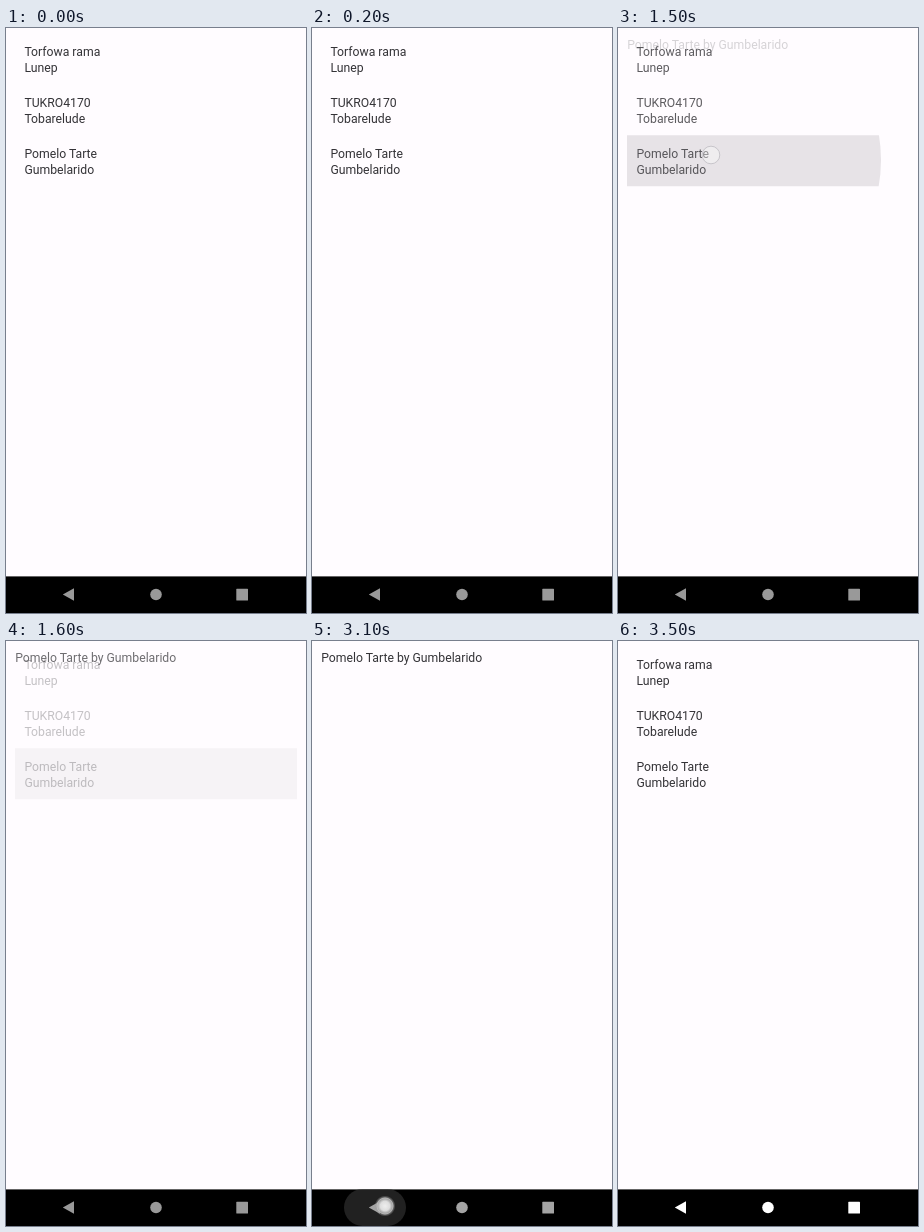
An HTML page for the animation above (4300 ms loop, 300 by 585 pixels).

```html
<!DOCTYPE html>
<html lang="pl">
<head>
<meta charset="utf-8">
<title>Song list</title>
<style>
  html, body { margin: 0; width: 100%; height: 100%; overflow: hidden; background: #fffcff; }
  svg { display: block; width: 300px; height: 585px; }
  text { font: 12.22px Roboto, sans-serif; fill: #343337; }
</style>
</head>
<body>
<svg viewBox="0 0 300 585">
  <defs>
    <clipPath id="row"><rect x="9" y="107.3" width="282" height="51"/></clipPath>
    <clipPath id="bar"><rect y="548.4" width="300" height="37"/></clipPath>
    <radialGradient id="glow">
      <stop offset="0" stop-color="#eee"/>
      <stop offset=".45" stop-color="#ddd"/>
      <stop offset=".72" stop-color="#aaa" stop-opacity=".9"/>
      <stop offset="1" stop-color="#999" stop-opacity="0"/>
    </radialGradient>
  </defs>

  <g id="ripple" clip-path="url(#row)">
    <circle id="wave" cx="112" cy="132" fill="#1c1b1f" fill-opacity=".13"/>
  </g>
  <g id="list"></g>
  <text id="title" x="9.2" y="21.2"></text>
  <circle id="tap" cx="93" cy="127" r="8.8" fill="#fff" fill-opacity=".35" stroke="#b4b2b8" stroke-opacity=".65"/>

  <rect y="548.4" width="300" height="37"/>
  <g clip-path="url(#bar)">
    <rect id="press" x="32" y="548" width="62" height="37" rx="18.5" fill="#262626"/>
    <g id="nav">
      <path d="M56.8 566.5L68 560.3V572.7Z"/>
      <circle cx="150" cy="566.5" r="5.8"/>
      <rect x="230.3" y="560.8" width="11.7" height="11.7" rx=".6"/>
    </g>
    <g id="backTap">
      <circle cx="73" cy="565" r="10.5" fill="url(#glow)"/>
      <circle cx="73" cy="565" r="8" fill="none" stroke="#ccc" stroke-opacity=".6"/>
    </g>
  </g>
</svg>
<script>
const LOOP = 4300, STEP = 100;
const TAP = 1400, BACK = 3100, HOME = 3500;
const songs = [
  ['Torfowa rama', 'Lunep'],
  ['TUKRO4170', 'Tobarelude'],
  ['Pomelo Tarte', 'Gumbelarido']
];
const $ = id => document.getElementById(id);

function addLine(text, y) {
  const line = document.createElementNS('http://www.w3.org/2000/svg', 'text');
  line.setAttribute('x', 18.4);
  line.setAttribute('y', y);
  line.textContent = text;
  $('list').append(line);
}

songs.forEach(([song, artist], i) => {
  const y = 27.5 + i * 51.1;
  addLine(song, y);
  addLine(artist, y + 16.4);
});
$('title').textContent = songs[2].join(' by ');

function smooth(from, to, t) {
  const p = Math.min(1, Math.max(0, (t - from) / (to - from)));
  return p * p * (3 - 2 * p);
}

const between = (from, to, t) => t >= from && t < to;
const fade = (id, opacity) => $(id).setAttribute('opacity', Number(opacity));

function draw(now) {
  const t = Math.floor(now % LOOP / STEP) * STEP;
  const open = smooth(TAP + 20, TAP + 300, t);
  const back = smooth(BACK, HOME, t);
  const release = smooth(BACK - STEP, HOME, t);
  // A faint trace of the list stays behind until the back press.
  const trace = level => t < BACK ? Math.max(level, 1 - open) : 0;

  fade('title', open - back);
  fade('list', Math.max(back, trace(.03)));
  fade('ripple', t > TAP && trace(.17));
  $('wave').setAttribute('r', 151 + Math.max(0, t - TAP - STEP));
  fade('tap', between(TAP, TAP + 2 * STEP, t));
  fade('backTap', between(BACK, BACK + STEP, t));
  fade('press', t >= BACK && 1 - release);

  const grey = Math.round(153 + 102 * release);
  $('nav').setAttribute('fill', `rgb(${grey},${grey},${grey})`);
}

function tick() {
  draw(performance.now());
  requestAnimationFrame(tick);
}
tick();
</script>
</body>
</html>
```
